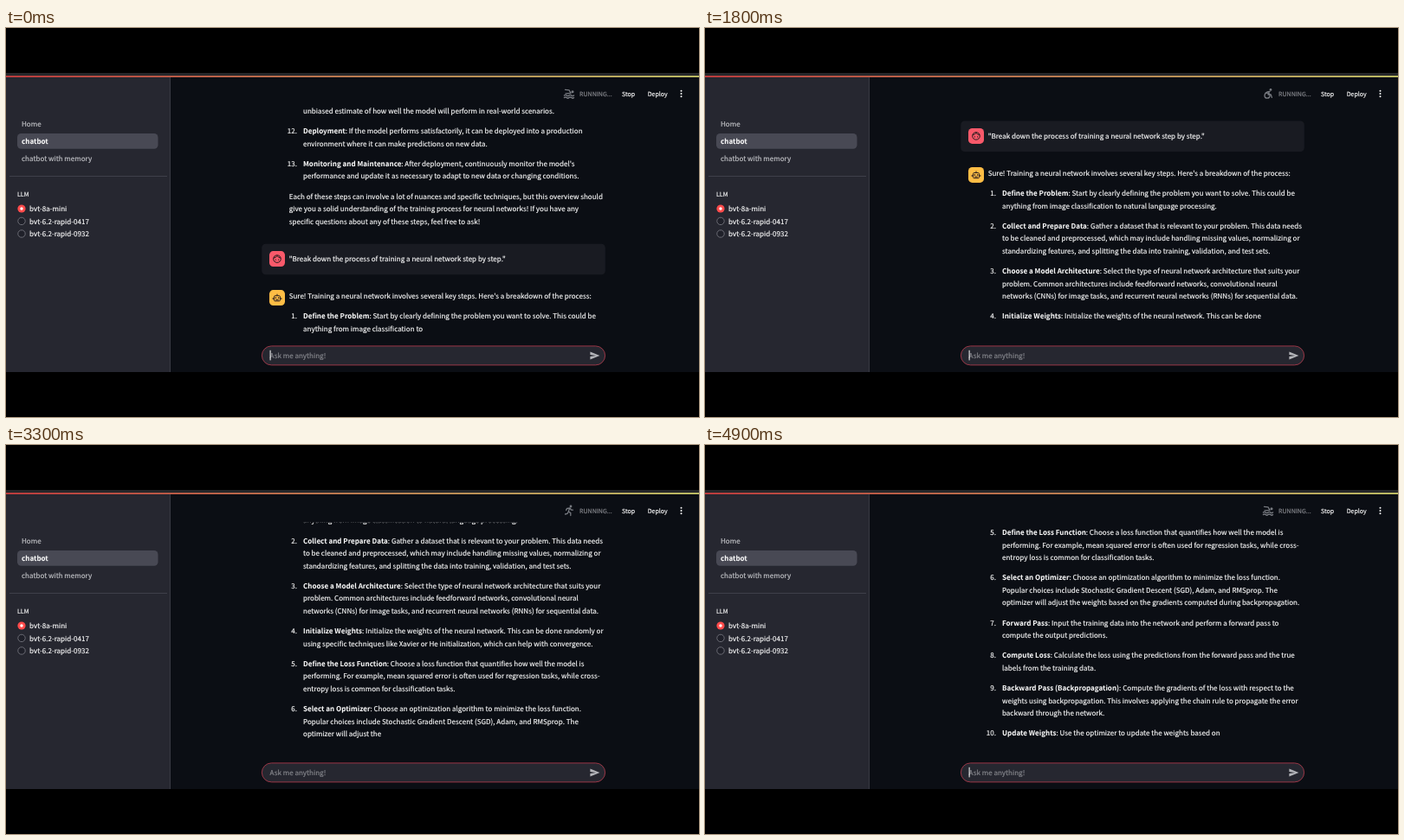
These frames come from a looping animation (800x450 px, 5000 ms). An HTML page:

```html
<!DOCTYPE html>
<html lang="en">
<head>
<meta charset="utf-8">
<title>Chatbot</title>
<style>
  html, body { margin: 0; width: 100%; height: 100%; overflow: hidden; background: #000; }
  svg { display: block; width: 800px; height: 450px; }
  text {
    font: 400 8.06px "Noto Sans CJK JP", "Noto Sans CJK SC", "Noto Sans CJK", sans-serif;
    color: #fafafa; fill: currentColor; stroke: currentColor; stroke-width: 0.16;
    white-space: pre; text-rendering: geometricPrecision;
  }
  .small { font-size: 7.05px; }
  .bold { font-weight: 600; stroke-width: 0.05; }
  .dim { color: #c3c4c8; }
  .faint { color: #87888e; }
  .num { text-anchor: end; }
  .line { fill: none; stroke: #777a80; stroke-width: 1.3; stroke-linecap: round; stroke-linejoin: round; }
  .line circle { fill: #777a80; stroke: none; }
  .line .wheel { fill: none; stroke: #777a80; }
  .face { fill: none; stroke: #2a1d1e; stroke-width: 1; }
  .face .dot { fill: #2a1d1e; stroke: none; }
  #caret { animation: blink 1s step-end infinite; }
  @keyframes blink { 0% { opacity: 1 } 10% { opacity: 0 } 60% { opacity: 1 } }
</style>
</head>
<body>
<svg viewBox="0 0 800 450">
  <defs>
    <linearGradient id="rainbow">
      <stop offset="0" stop-color="#ff4b4b"/><stop offset="1" stop-color="#fffd80"/>
    </linearGradient>
    <clipPath id="view"><rect x="190" y="89.75" width="610" height="272"/></clipPath>
  </defs>

  <rect y="52" width="800" height="346" fill="#0b0e14"/>
  <rect y="52" width="800" height="3.5" fill="#26272a"/>

  <!-- sidebar -->
  <rect y="57" width="189.5" height="341" fill="#262730"/>
  <rect x="189" y="57" width="1" height="341" fill="#383a43"/>
  <rect y="55.4" width="800" height="1.4" fill="url(#rainbow)"/>
  <rect x="13" y="122" width="162.5" height="17.8" rx="4.5" fill="#484954"/>
  <text class="dim" x="18" y="114">Home</text>
  <text class="bold" x="18" y="134">chatbot</text>
  <text class="dim" x="18" y="154.3">chatbot with memory</text>
  <rect x="4" y="171.2" width="182" height="0.8" fill="#454650"/>
  <text class="small" x="13" y="194.6">LLM</text>
  <circle cx="18" cy="209" r="4.6" fill="#ff4b4b"/>
  <circle cx="18" cy="209" r="1.7" fill="#fff"/>
  <g fill="#1f2029" stroke="#7b7c84" stroke-width="0.8">
    <circle cx="18" cy="223.4" r="4.2"/><circle cx="18" cy="238" r="4.2"/>
  </g>
  <text x="27" y="211.9">bvt-8a-mini</text>
  <text x="27" y="226.5">bvt-6.2-rapid-0417</text>
  <text x="27" y="241">bvt-6.2-rapid-0932</text>

  <!-- toolbar -->
  <g id="sports" class="line" transform="translate(650 76)">
    <g><path d="M-4.5-4.6 0-4.2 2-.6-4-.2M-5.6 2q1.4-1.3 2.8 0t2.8 0 2.8 0 2.8 0M-5.6 4.6q1.4-1.3 2.8 0t2.8 0 2.8 0 2.8 0"/><circle cx="4" cy="-2.2" r="1.5"/></g>
    <g><path d="M-4-1.5-1.5-2.6 2-2 4.4-3M1-2 0 1 2.5 3 1.5 5M0 1-2 3-4.6 4.6"/><circle cx="3" cy="-4.6" r="1.4"/></g>
    <g><path d="M-4.6-2.2H4.6M0-2V1.6M-1 1V5.4M1 1V5.4M-.8-1.6V1.4M.8-1.6V1.4"/><circle cy="-4.8" r="1.4"/></g>
    <g><path d="M2-2.6-1-2-3-.6M1.4-2.2 0 1H3.2L4.4 4.4"/><circle class="wheel" cx="-1" cy="2.2" r="3"/><circle cx="3" cy="-4.6" r="1.4"/></g>
    <g><path d="M-3.4-.6-2.4-2.6 1-3 2.6-.8 4.4-.8M.4-2.6-.6 1 1.8 2.6V5.6M-.6 1-2 3.4-4.4 4"/><circle cx="2" cy="-5" r="1.4"/></g>
    <g><path d="M-3.4-.6-2.4-2.6 1-3 2.6-.8 4.4-.8M.4-2.6-.6 1 1.8 2.6V5.6M-.6 1-2 3.4-4.4 4"/><circle cx="2" cy="-5" r="1.4"/></g>
  </g>
  <text class="small faint" x="662" y="78.6">RUNNING...</text>
  <text class="small" x="711" y="78.6">Stop</text>
  <text class="small" x="740.7" y="78.6">Deploy</text>
  <g fill="#fafafa"><circle cx="779.5" cy="72.8" r="1"/><circle cx="779.5" cy="76" r="1"/><circle cx="779.5" cy="79.2" r="1"/></g>

  <!-- conversation, y = 0 at the middle of the reply's first line -->
  <g clip-path="url(#view)">
    <g id="chat">
      <rect x="295.3" y="-60.4" width="396.5" height="35.6" rx="4.5" fill="#191b22"/>
      <g transform="translate(313 -43)">
        <rect x="-9" y="-9" width="18" height="18" rx="4.5" fill="#f9596a"/>
        <g class="face"><circle r="4.3"/><path d="M-4.1-1Q-1-1.4 0-3.8 1-1.4 4.1-1"/><circle class="dot" cx="-1.6" cy="1" r=".7"/><circle class="dot" cx="1.6" cy="1" r=".7"/></g>
      </g>
      <g transform="translate(313 2)">
        <rect x="-9" y="-9" width="18" height="18" rx="4.5" fill="#ffbd45"/>
        <g class="face"><rect x="-3.4" y="-2.4" width="6.8" height="6.2" rx="1"/><path d="M0-2.4V-4.4M-4.8 0V2M4.8 0V2M-1.8 2.2H1.8"/><circle class="dot" cx="-1.6" cy="0" r=".8"/><circle class="dot" cx="1.6" cy="0" r=".8"/></g>
      </g>
    </g>
  </g>

  <!-- prompt -->
  <rect x="295.4" y="367.9" width="396.2" height="22" rx="11" fill="#262730" stroke="#a8394a" stroke-width="0.9"/>
  <text class="faint" x="304.6" y="381.5">Ask me anything!</text>
  <rect id="caret" x="304.6" y="372.8" width="1" height="11.6" fill="#fafafa"/>
  <path d="M674.4 374.4 685.4 379 674.4 383.6V380L681 379 674.4 378Z" fill="#b4b5ba"/>
</svg>

<script>
const LOOP = 5000, FRAME = 100, LEAD = 14.4, GAP = 9, REST = 333.5, DECAY = 20;
const chat = document.getElementById("chat");
const sports = [...document.getElementById("sports").children];

const steps = [
  ["Define the Problem",
    "Start by clearly defining the problem you want to solve. This could be",
    "anything from image classification to natural language processing."],
  ["Collect and Prepare Data",
    "Gather a dataset that is relevant to your problem. This data needs",
    "to be cleaned and preprocessed, which may include handling missing values, normalizing or",
    "standardizing features, and splitting the data into training, validation, and test sets."],
  ["Choose a Model Architecture",
    "Select the type of neural network architecture that suits your",
    "problem. Common architectures include feedforward networks, convolutional neural",
    "networks (CNNs) for image tasks, and recurrent neural networks (RNNs) for sequential data."],
  ["Initialize Weights",
    "Initialize the weights of the neural network. This can be done randomly or",
    "using specific techniques like Xavier or He initialization, which can help with convergence."],
  ["Define the Loss Function",
    "Choose a loss function that quantifies how well the model is",
    "performing. For example, mean squared error is often used for regression tasks, while cross-",
    "entropy loss is common for classification tasks."],
  ["Select an Optimizer",
    "Choose an optimization algorithm to minimize the loss function.",
    "Popular choices include Stochastic Gradient Descent (SGD), Adam, and RMSprop. The",
    "optimizer will adjust the weights based on the gradients computed during backpropagation."],
  ["Forward Pass",
    "Input the training data into the network and perform a forward pass to",
    "compute the output predictions."],
  ["Compute Loss",
    "Calculate the loss using the predictions from the forward pass and the true",
    "labels from the training data."],
  ["Backward Pass (Backpropagation)",
    "Compute the gradients of the loss with respect to the",
    "weights using backpropagation. This involves applying the chain rule to propagate the error",
    "backward through the network."],
  ["Update Weights", "Use the optimizer to update the weights based on"]
];

// [ms, step, tokens of that step already streamed]
const pace = [[0, 1, 24], [600, 2, 39], [1300, 3, 32], [2156, 5, 1], [2200, 5, 6], [2769, 6, 1],
  [2800, 6, 4], [3861, 8, 1], [3900, 8, 5], [4650, 10, 1], [4800, 10, 7], [4900, 10, 14]];

function add(tag, parent, attrs = {}, content = "") {
  const el = document.createElementNS("http://www.w3.org/2000/svg", tag);
  for (const k in attrs) el.setAttribute(k, attrs[k]);
  el.textContent = content;
  return parent.appendChild(el);
}
const write = (x, y, content, cls = "") => add("text", chat, { x, y: y + 3, class: cls }, content);

function richLine(x, y, title = "", body = "") {
  const el = write(x, y, "");
  return [add("tspan", el, { class: "bold" }, title), add("tspan", el, {}, body)];
}

// earlier messages
write(343, -214.4, "unbiased estimate of how well the model will perform in real-world scenarios.");
write(336, -190.9, "12.", "num");
richLine(343, -190.9, "Deployment", ": If the model performs satisfactorily, it can be deployed into a production");
write(343, -176.5, "environment where it can make predictions on new data.");
write(336, -153.1, "13.", "num");
richLine(343, -153.1, "Monitoring and Maintenance", ": After deployment, continuously monitor the model's");
write(343, -138.7, "performance and update it as necessary to adapt to new data or changing conditions.");
write(326.7, -115.2, "Each of these steps can involve a lot of nuances and specific techniques, but this overview should");
write(326.7, -100.8, "give you a solid understanding of the training process for neural networks! If you have any");
write(326.7, -86.4, "specific questions about any of these steps, feel free to ask!");
write(326.7, -43.2, "\"Break down the process of training a neural network step by step.\"");
write(326.7, 0, "Sure! Training a neural network involves several key steps. Here's a breakdown of the process:");

// Tokens of a step: number, title words, closing "**", ":", body words
const rows = [], starts = [];
let y = LEAD + GAP, token = 0;
steps.forEach(([title, ...lines], i) => {
  starts.push(token);
  lines.forEach((line, j) => {
    const row = { y, first: token, words: line.split(" ") };
    if (j === 0) {
      row.title = title.split(" ");
      row.num = write(336, y, i + 1 + ".", "num");
      token += row.title.length + 3;
    }
    [row.bold, row.plain] = richLine(343, y);
    token += row.words.length;
    rows.push(row);
    y += LEAD;
  });
  y += GAP;
});

const keys = pace.map(([t, step, n]) => [t, starts[step - 1] + n]);

// Piecewise linear lookup from column a to column b of the keys
function lookup(v, a, b) {
  if (v <= keys[0][a]) return keys[0][b];
  for (let i = 1; i < keys.length; i++) {
    const p = keys[i - 1], q = keys[i];
    if (v <= q[a]) return p[b] + (q[b] - p[b]) * (v - p[a]) / (q[a] - p[a]);
  }
  return keys[keys.length - 1][b];
}

rows.forEach((row, i) => {
  row.born = lookup(row.first + 1, 1, 0);
  row.step = i ? row.y - rows[i - 1].y : 0;
});

function fill(row, n) {
  let bold = "", plain = "";
  if (row.title) {
    row.num.style.visibility = n > 0 ? "visible" : "hidden";
    const size = row.title.length, k = n - 1;
    if (k > size) {
      bold = row.title.join(" ");
      if (k > size + 1) plain = [":", ...row.words.slice(0, k - size - 2)].join(" ");
    } else if (k > 0) {
      plain = "**" + row.title.slice(0, k).join(" ");
    }
  } else if (n > 0) {
    plain = row.words.slice(0, n).join(" ");
  }
  row.bold.textContent = bold;
  row.plain.textContent = plain;
}

function draw(t) {
  const shown = Math.floor(lookup(t, 0, 1) + 1e-6);
  let bottom = 0, lag = 0;
  for (const row of rows) {
    const n = shown - row.first;
    fill(row, n);
    if (n > 0) {
      bottom = row.y;
      lag += row.step * Math.exp(-Math.max(0, t - row.born) / DECAY);
    }
  }
  chat.setAttribute("transform", `translate(0 ${(REST - bottom + lag).toFixed(2)})`);
  const pose = Math.floor(t / 200) % sports.length;
  sports.forEach((el, i) => el.style.display = i === pose ? "" : "none");
}

let last = -1;
function tick() {
  const t = Math.floor(performance.now() % LOOP / FRAME) * FRAME;
  if (t !== last) draw(last = t);
  requestAnimationFrame(tick);
}
tick();
</script>
</body>
</html>
```
